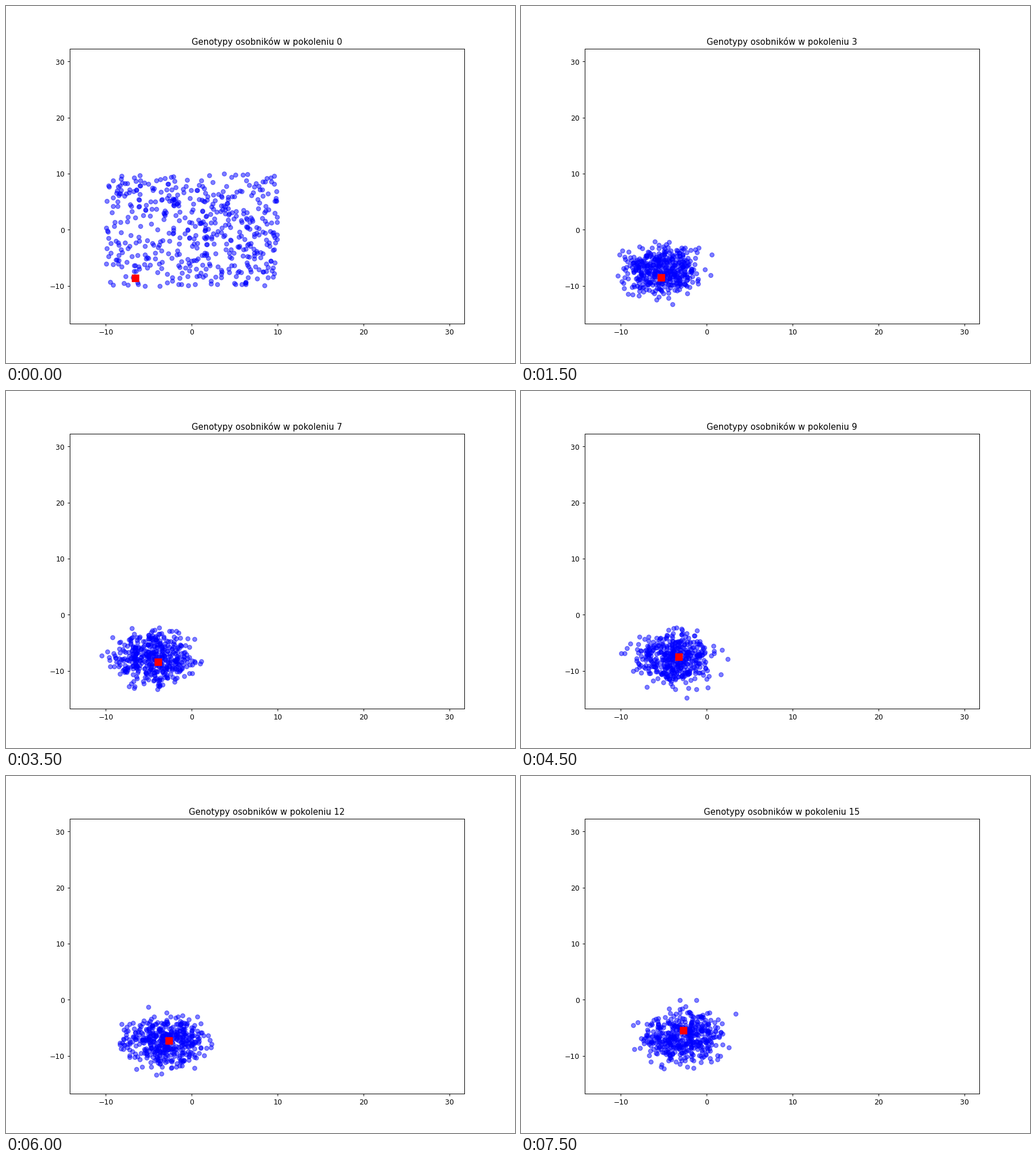
Recreate the animation shown at these times as a matplotlib script. Size 894 by 626 pixels, loop 8000 ms.

```python
import numpy as np
import matplotlib.pyplot as plt
from matplotlib.animation import FuncAnimation

GENERATIONS = 16
START_SIZE = 500   # random individuals in generation 0
CLOUD_SIZE = 440   # distinct individuals after selection
CORE = 4.0         # radius of the selected parents
MUTATION = 1.1     # spread added by mutation

# Key generations with positions, linear in between
BEST = ([0, 3, 5, 7, 10, 12, 15],
        [-6.55, -5.35, -4.06, -3.96, -2.92, -2.69, -2.74],
        [-8.60, -8.45, -8.10, -8.40, -6.98, -7.28, -5.45])
CENTER = ([1, 4, 10, 15],
          [-5.6, -5.2, -3.5, -2.9],
          [-6.4, -7.7, -7.9, -6.7])


def position(path, gen):
    keys, xs, ys = path
    return np.interp(gen, keys, xs), np.interp(gen, keys, ys)


def population(gen):
    """Uniform square at first, then a mutated disc around the center."""
    rng = np.random.default_rng(gen)
    if gen == 0:
        return rng.uniform(-10, 10, (2, START_SIZE))
    cx, cy = position(CENTER, gen)
    r = CORE * rng.random(CLOUD_SIZE) ** 0.6
    a = rng.uniform(0, 2 * np.pi, CLOUD_SIZE)
    dx, dy = rng.normal(0, MUTATION, (2, CLOUD_SIZE))
    return cx + r * np.cos(a) + dx, cy + r * np.sin(a) + dy


# 894 x 626 pixels
fig, ax = plt.subplots(figsize=(10, 7.003), dpi=89.4)
ax.set_xlim(-14.22, 31.70)
ax.set_ylim(-16.75, 32.28)
dots, = ax.plot([], [], "bo", alpha=0.5, markersize=6)
best, = ax.plot([], [], "rs", markersize=10)
title = ax.set_title("")


def update(gen):
    dots.set_data(*population(gen))
    x, y = position(BEST, gen)
    best.set_data([x], [y])
    title.set_text(f"Genotypy osobników w pokoleniu {gen}")
    return dots, best, title


anim = FuncAnimation(fig, update, frames=GENERATIONS, interval=500,
                     repeat=True, repeat_delay=0, blit=False)
plt.show()
```
